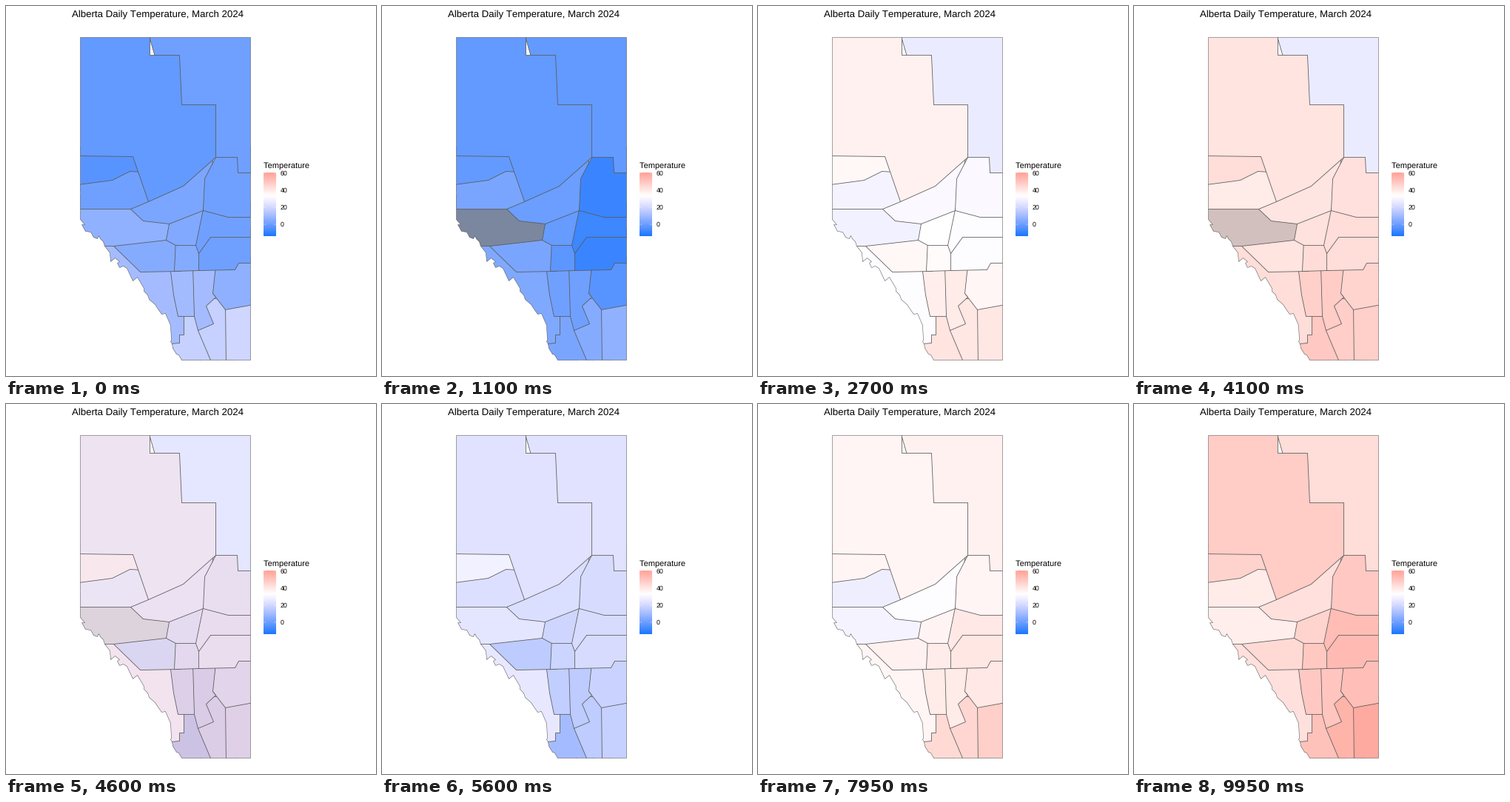
Recreate the animation shown at these times as a matplotlib script. Size 500 px wide and 500 px high, loop 10000 ms.

```python
import numpy as np
import matplotlib.pyplot as plt
from matplotlib.animation import FuncAnimation
from matplotlib.patches import Polygon

SIZE, DPI, STEP, LOOP = 500, 100, 50, 10000
PX = 72 / DPI  # one pixel in points
KEY_TIMES = [0, 1100, 2700, 4100, 5600, 7950, 9950]
WHITE, COLDEST, HOTTEST = 33, -14, 60  # degrees on the colour scale
GREY = np.full(3, 127 / 255)

plt.rcParams.update({"font.family": "Liberation Sans", "text.hinting": "none",
                     "text.kerning_factor": 6})
fig = plt.figure(figsize=(SIZE / DPI, SIZE / DPI), dpi=DPI, facecolor="white")
ax = fig.add_axes([0, 0, 1, 1])
ax.axis("off")


def heat(degrees):
    """Blue below the white point, pink above it."""
    degrees = np.asarray(degrees, float)
    cold = np.clip((WHITE - degrees) / (WHITE - COLDEST), 0, 1)
    warm = np.clip((degrees - WHITE) / (HOTTEST - WHITE), 0, 1)
    rgb = [255 - 227 * cold ** 1.28, 255 - 136 * cold - 92 * warm, 255 - 103 * warm]
    return np.stack(rgb, axis=-1) / 255


# Straight sides of the province, then the mountain border from south to north
outline = Polygon(
    [(100, 42), (330, 42), (330, 478), (237, 478), (233, 471), (230, 470), (225, 462),
     (224, 456), (222, 453), (223, 451), (222, 431), (215, 415), (210, 416), (207, 412),
     (201, 403), (193, 396), (191, 390), (186, 385), (186, 381), (177, 366), (171, 371),
     (163, 354), (158, 351), (153, 353), (150, 347), (153, 345), (147, 340), (141, 345),
     (140, 333), (133, 324), (131, 318), (127, 314), (125, 310), (123, 314), (118, 312),
     (114, 305), (107, 304), (102, 295), (106, 295), (100, 288)],
    fill=False, ec="#595959", lw=0.55 * PX, zorder=3)
ax.add_patch(outline)

regions = []


def region(points, readings=None):
    """Regions overlap, each hiding the loose edges of those before it."""
    patch = Polygon(points, ec="#595959", lw=0.8 * PX, joinstyle="round")
    ax.add_patch(patch)
    patch.set_clip_path(outline)
    regions.append((patch, np.mean(points, axis=0), readings))
    return patch


# Mountains and south; readings are the degrees at each key time
region([(90, 310), (262, 310), (262, 490), (90, 490)], [10, 3, 32, 43, 25, 36, 42])
region([(240, 410), (262, 410), (290, 490), (215, 490), (223, 456), (234, 455),
        (234, 444), (240, 444)], [17, 2, 41, 49, 10, 44, 51])
region([(259, 438), (281, 490), (310, 490), (310, 395), (265, 395)])
region([(296, 400), (340, 395), (340, 490), (297, 490)], [19, 6, 40, 47, 17, 47, 58])
region([(272, 340), (340, 340), (340, 402), (296, 410), (272, 379)])
region([(222, 350), (258, 350), (258, 419), (232, 419), (226, 390), (222, 358)])
region([(252, 350), (254, 419), (259, 438), (280, 429), (270, 405), (283, 393),
        (279, 388), (283, 350)], [10, 0, 39, 48, 15, 39, 50])

# Centre and east
region([(145, 324), (181, 359), (235, 358), (235, 310), (145, 315)],
       [4, 2, 35, 41, 15, 37, 44])
region([(229, 315), (270, 315), (262, 357), (227, 358)])
gap_patch = region([(90, 255), (185, 255), (230, 290), (216, 316), (145, 324),
                    (90, 324)], [6, 0, 28, 41, 24, 29, 38])
region([(222, 282), (275, 270), (262, 323), (229, 323), (216, 316), (220, 294)])
region([(268, 300), (340, 300), (340, 347), (314, 347), (309, 356), (260, 357),
        (260, 334)], [0, -9, 32, 43, 21, 40, 53])
region([(268, 265), (340, 265), (340, 312), (276, 312), (260, 334), (256, 323)])

# North
region([(90, 190), (170, 190), (188, 240), (90, 250)], [-4, -2, 35, 43, 28, 36, 46])
region([(90, 242), (143, 235), (167, 223), (185, 224), (200, 270), (168, 274),
        (90, 274)], [0, 2, 29, 39, 22, 27, 39])
region([(168, 274), (185, 290), (220, 294), (266, 276), (283, 190), (200, 230),
        (192, 264)])
region([(283, 204), (268, 233), (266, 276), (300, 285), (340, 285), (340, 190),
        (290, 190)], [0, -9, 31, 42, 21, 36, 49])
region([(190, 30), (340, 30), (340, 225), (313, 225), (312, 204), (240, 204)],
       [0, -2, 26, 26, 23, 37, 43])
region([(90, 30), (194, 30), (194, 66), (234, 66), (237, 133), (283, 133), (283, 204),
        (239, 243), (192, 264), (171, 203), (90, 202)], [-2, -2, 37, 41, 23, 36, 48])

stations = [(centre, readings) for _, centre, readings in regions if readings]
places = np.array([s[0] for s in stations])
records = np.array([s[1] for s in stations])


def estimate(centre):
    """Readings at a place, weighted by nearness to the stations."""
    weight = 1 / (((places - centre) ** 2).sum(axis=1) + 1) ** 2
    return weight @ records / weight.sum()


key_colours = [heat(readings or estimate(centre)) for _, centre, readings in regions]


def label(x, y, text, size):
    ax.text(x, y, text, size=size * PX, va="baseline")


def draw_legend():
    left, right, top, bottom = 347.5, 364.5, 224.5, 310.5
    bar = heat(np.linspace(HOTTEST, COLDEST, 86))[:, None]
    ax.imshow(bar, extent=(left, right, bottom, top), aspect="auto",
              interpolation="nearest")
    for value in range(0, 61, 20):
        y = 294.5 - value * 1.15
        for x in (left, right - 3.4):
            ax.plot([x, x + 3.4], [y, y], color="white", lw=0.4 * PX)
        label(370, y + 3.2, str(value), 8.8)
    label(347.2, 218.5, "Temperature", 11)


draw_legend()
label(88.5, 14.5, "Alberta Daily Temperature, March 2024", 13.2)
ax.set_xlim(-0.5, SIZE - 0.5)
ax.set_ylim(SIZE - 0.5, -0.5)


def missing(ms):
    """How far the station with gaps has faded to grey."""
    return max(0, 1 - abs(ms - 1015) / 340, 1 - abs(ms - 4320) / 340)


def update(frame):
    ms = frame * STEP
    i = min(np.searchsorted(KEY_TIMES, ms, side="right"), len(KEY_TIMES) - 1) - 1
    part = (ms - KEY_TIMES[i]) / (KEY_TIMES[i + 1] - KEY_TIMES[i])
    mix = 1 - (1 - part) ** 2
    for (patch, _, _), keys in zip(regions, key_colours):
        colour = keys[i] + (keys[i + 1] - keys[i]) * mix
        if patch is gap_patch:
            colour = colour + (GREY - colour) * missing(ms)
        patch.set_facecolor(np.clip(colour, 0, 1))
    return [r[0] for r in regions]


anim = FuncAnimation(fig, update, frames=LOOP // STEP, interval=STEP, repeat=True,
                     repeat_delay=0, blit=False)
plt.show()
```
